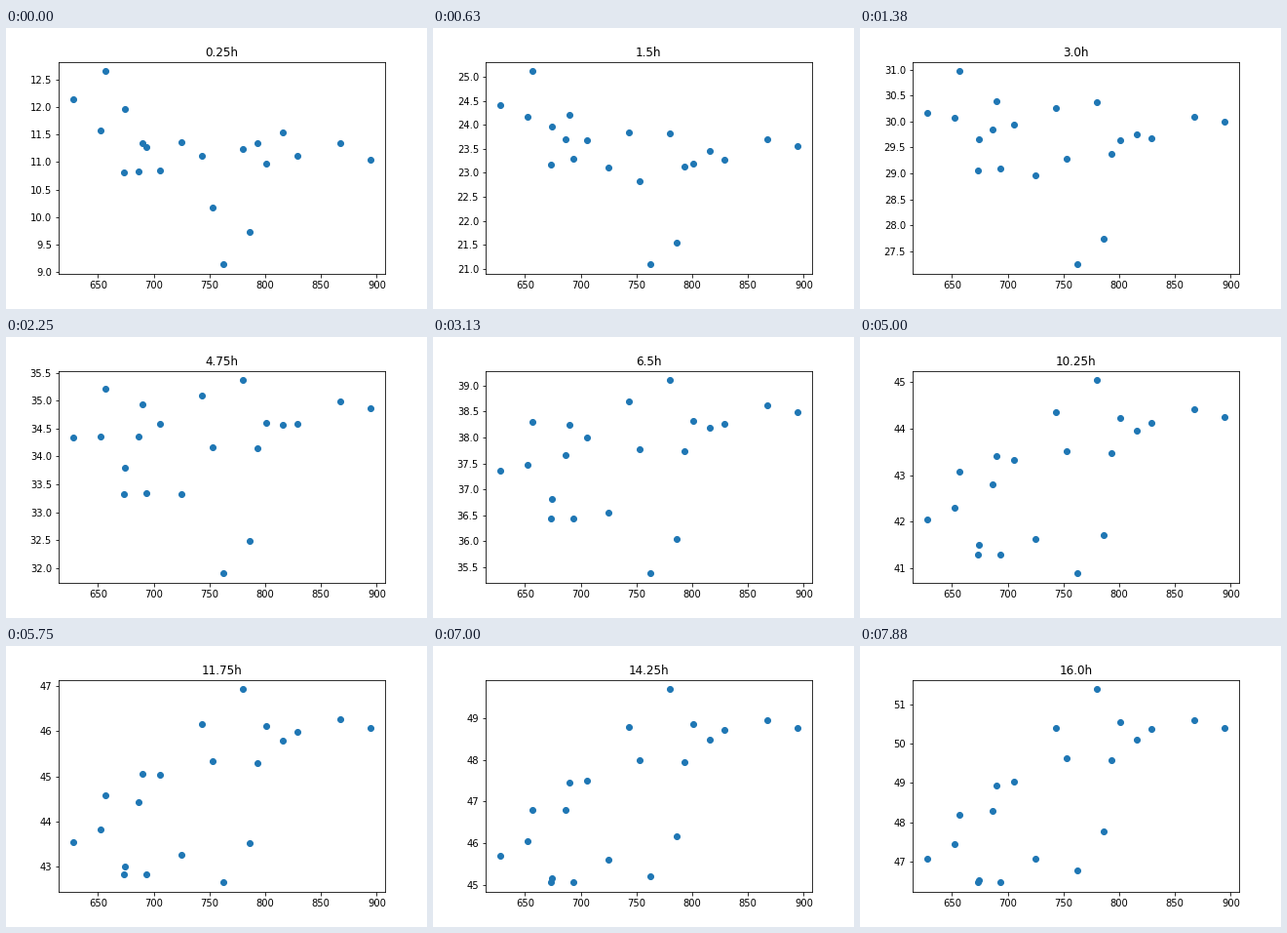
Recreate the animation shown at these times as a matplotlib script. Size 432 by 288 pixels, loop 8000 ms.

```python
import numpy as np
import matplotlib.pyplot as plt
from matplotlib.animation import FuncAnimation

plt.rcParams.update({"font.family": "DejaVu Sans", "font.size": 10})

STEPS = 64
HOURS_PER_STEP = 0.25
START, END = HOURS_PER_STEP, STEPS * HOURS_PER_STEP

# Each sample: position, first value, last value.
samples = [
    (628, 12.14, 47.07), (652, 11.58, 47.45), (657, 12.65, 48.19),
    (673, 10.81, 46.47), (674, 11.97, 46.53), (686, 10.83, 48.29),
    (690, 11.34, 48.94), (693, 11.27, 46.47), (706, 10.85, 49.04),
    (725, 11.36, 47.07), (743, 11.11, 50.40), (753, 10.17, 49.63),
    (762, 9.14, 46.78), (780, 11.24, 51.38), (786, 9.73, 47.77),
    (793, 11.34, 49.58), (801, 10.97, 50.55), (816, 11.54, 50.11),
    (829, 11.11, 50.38), (867, 11.34, 50.60), (894, 11.04, 50.40),
]
x, first, last = np.array(samples).T

# Low positions grow early, high ones late.
bend = np.interp(x, [655, 690, 715, 795, 830, 894],
                 [0.70, 0.40, 0.0, -0.97, -0.91, -0.58])


def progress(hours):
    """Share of the growth done, fast at first and then slowing down."""
    a, t, b = np.power([START, hours, END], 0.2)
    return (t - a) / (b - a)


def values(hours):
    p = progress(hours)
    bow = 4.85 * p * (1 - p) ** 1.28
    return first + (last - first) * p + bend * bow


fig, ax = plt.subplots(figsize=(6, 4), dpi=72, facecolor="white")
fig.subplots_adjust(left=0.125, right=0.9, bottom=0.125, top=0.88)


def draw(step):
    hours = (step + 1) * HOURS_PER_STEP
    ax.clear()
    ax.scatter(x, values(hours), color="#1f77b4")
    ax.set_title(f"{hours}h", fontsize=12)


anim = FuncAnimation(fig, draw, frames=STEPS, init_func=lambda: None,
                     interval=125, repeat=True, repeat_delay=0)
plt.show()
```
